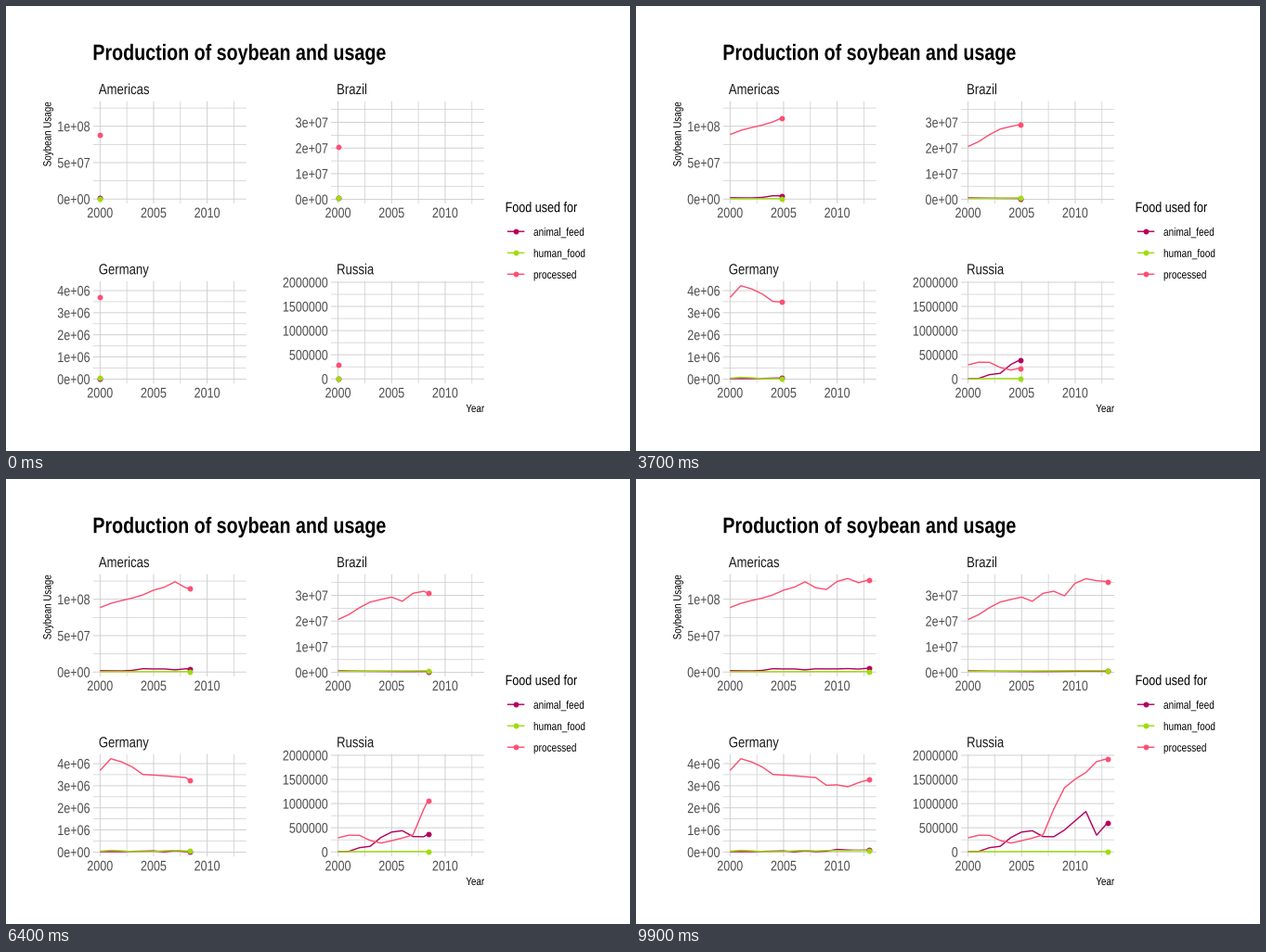
A matplotlib script for the animation above (10 s loop, 672 by 480 pixels).

```python
import numpy as np
import matplotlib.pyplot as plt
from matplotlib.animation import FuncAnimation
from matplotlib.patches import PathPatch
from matplotlib.textpath import TextPath
from matplotlib.transforms import Affine2D

W, H, DPI = 672, 480, 96
FRAMES, INTERVAL = 100, 100
PX = 72 / DPI          # one pixel in points
CONDENSED = 0.82       # narrow cut of the sans face
GRID, TICK, STRIP = "#cccccc", "#4d4d4d", "#1a1a1a"
COLORS = {"animal_feed": "#b4005e", "human_food": "#9edc0c", "processed": "#fb5072"}
YEARS = np.arange(14)
YEAR_PX = 11.535
PANEL_W, PANEL_H = 164.9, 110.4

fig = plt.figure(figsize=(W / DPI, H / DPI), dpi=DPI, facecolor="white")
ax = fig.add_axes([0, 0, 1, 1])
ax.set_xlim(0, W)
ax.set_ylim(H, 0)
ax.axis("off")


def text(x, y, s, size, color="black", align="left", weight="normal", angle=0):
    """Place text with its baseline at y; align refers to the x position."""
    path = TextPath((0, 0), s, size=size, prop={"family": "Liberation Sans", "weight": weight})
    path = path.transformed(Affine2D().scale(CONDENSED, -1))
    box = path.get_extents()
    shift = {"left": 0, "center": (box.x0 + box.x1) / 2, "right": box.x1}[align]
    place = Affine2D().translate(-shift, 0).rotate_deg(-angle).translate(x, y)
    ax.add_patch(PathPatch(path.transformed(place), fc=color, lw=0, zorder=4))


def line(xs, ys, color, width, zorder):
    return ax.plot(xs, ys, color=color, lw=width * PX, zorder=zorder,
                   solid_capstyle="butt", solid_joinstyle="round", snap=False)[0]


def dot(x, y, color, zorder=3):
    return ax.plot([x], [y], "o", color=color, ms=5.9 * PX, mew=0, zorder=zorder, snap=False)[0]


def series(*knots):
    """Yearly values from evenly spread knots."""
    return np.interp(YEARS, np.linspace(0, 13, len(knots)), knots)


class Panel:
    def __init__(self, name, left, top, zero, scale, step, labels, data):
        self.x0, self.zero, self.scale = left + 7.5, zero, scale
        right, bottom = left + PANEL_W, top + PANEL_H
        text(left + 6, top - 7.5, name, 16, STRIP)
        for k in range(2 * len(labels)):
            y = zero - k * step * scale / 2
            if y > top:
                line([left, right], [y, y], GRID, 0.9 - 0.2 * (k % 2), 0)
        for k, label in enumerate(labels):
            text(left - 3.8, zero - k * step * scale + 5.5, label, 15.33, TICK, "right")
        for k in range(6):
            x = self.x(2.5 * k)
            line([x, x], [top, bottom], GRID, 0.9 - 0.2 * (k % 2), 0)
            if k % 2 == 0:
                text(x, bottom + 15.2, str(2000 + 5 * k // 2), 15.33, TICK, "center")
        self.tracks = [(v, line([], [], c, 1.42, 2), dot(0, 0, c))
                       for v, c in zip(data, COLORS.values())]

    def x(self, year):
        return self.x0 + year * YEAR_PX

    def y(self, value):
        return self.zero - value * self.scale

    def reveal(self, now):
        for values, path, head in self.tracks:
            past = YEARS[YEARS < now]
            value = np.interp(now, YEARS, values)
            path.set_data(self.x(np.append(past, now)),
                          self.y(np.append(values[past], value)))
            head.set_data([self.x(now)], [self.y(value)])


# Values are in millions of tonnes-scale units.
AMERICAS = [
    series(1.8, 1.6, 1.5, 2.2, 4.5, 4.2, 4.2, 3.0, 4.4, 4.2, 4.3, 4.7, 4.0, 5.4),
    series(0.4, 0.7),
    series(88.6, 94.3, 98.2, 101.5, 106, 112.5, 116.6, 124, 115.7, 113.5,
           124.5, 128.5, 122.7, 126.8),
]
BRAZIL = [
    series(0.6, 0.45, 0.4, 0.35, 0.4, 0.5, 0.55),
    series(0.4, 0.7),
    series(20.6, 22.5, 25.2, 27.4, 28.4, 29.3, 27.7, 30.8, 31.6, 29.8,
           34.7, 36.5, 35.7, 35.4),
]
GERMANY = [
    series(.02, .02, .02, .03, .04, .05, .01, .06, .02, .04, .12, .09, .08, .09),
    series(.04, .08, .06, .02, .02, .02, .06, .07, .05, .07, .06, .06, .08, .07),
    series(3.69, 4.22, 4.08, 3.85, 3.51, 3.48, 3.45, 3.41, 3.37, 3.02,
           3.04, 2.95, 3.14, 3.28),
]
RUSSIA = [
    series(.005, .01, .087, .115, .298, .41, .438, .317, .313, .452,
           .644, .836, .346, .596),
    series(.003, .008, .006),
    series(.29, .345, .342, .235, .183, .231, .285, .354, .885, 1.327,
           1.506, 1.644, 1.869, 1.929),
]

panels = [
    Panel("Americas", 93.8, 102.6, 208.2, 0.785, 50, ["0e+00", "5e+07", "1e+08"], AMERICAS),
    Panel("Brazil", 350.1, 102.6, 208.6, 2.77, 10, ["0e+00", "1e+07", "2e+07", "3e+07"], BRAZIL),
    Panel("Germany", 93.8, 296.8, 402.4, 23.85, 1,
          ["0e+00"] + [f"{k}e+06" for k in range(1, 5)], GERMANY),
    Panel("Russia", 350.1, 296.8, 402.2, 52.1, 0.5,
          [str(500000 * k) for k in range(5)], RUSSIA),
]

text(93.3, 58.2, "Production of soybean and usage", 24, weight="bold")
text(48.5, 173.3, "Soybean Usage", 12, angle=90)
text(515, 438, "Year", 12, align="right")
text(537.6, 222.2, "Food used for", 15.33)
for k, (name, color) in enumerate(COLORS.items()):
    y = 243.2 + 23.04 * k
    line([539.9, 558.3], [y, y], color, 1.42, 2)
    dot(549.1, y, color)
    text(568, y + 4.6, name, 12.27)


def update(i):
    now = 13 * i / (FRAMES - 1)
    for panel in panels:
        panel.reveal(now)
    return []


anim = FuncAnimation(fig, update, frames=FRAMES, interval=INTERVAL,
                     repeat=True, repeat_delay=0, blit=False)
plt.show()
```
